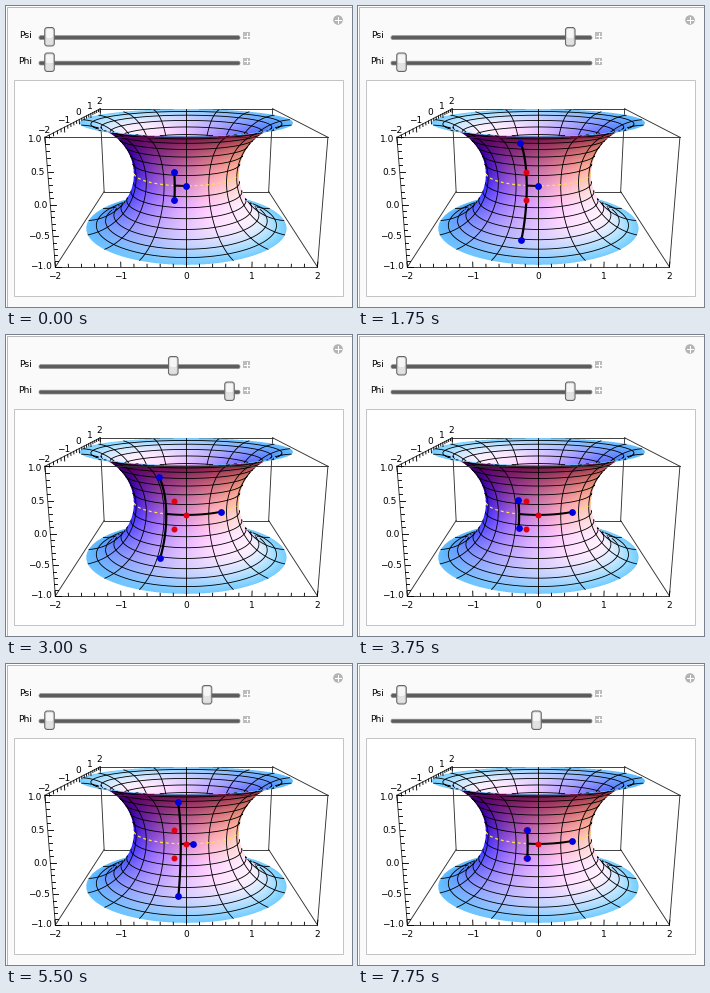
A matplotlib script that plays this animation: 346 by 301 pixels, repeating every 8000 ms.

```python
import numpy as np
import matplotlib.pyplot as plt
from matplotlib.animation import FuncAnimation
from matplotlib.patches import Circle, FancyBboxPatch, Rectangle

W, H, DPI = 346, 301, 100
PX = 72 / DPI                       # points per pixel
CX, CY, FOCAL = 180.4, 165.6, 429
EYE = np.array([0.0, -8.0, 2.0])
DIST = np.linalg.norm(EYE)
FWD = -EYE / DIST
UP = np.array([0.0, -FWD[2], FWD[1]])
U_MAX = 1.5

fig = plt.figure(figsize=(W / DPI, H / DPI), dpi=DPI, facecolor="white")
ax = fig.add_axes([0, 0, 1, 1])
ax.set_xlim(0, W)
ax.set_ylim(H, 0)
ax.axis("off")


# ---------- geometry ----------
def project(x, y, z):
    depth = DIST + y * FWD[1] + z * FWD[2]
    return (CX + FOCAL * x / depth,
            CY - FOCAL * (y * UP[1] + z * UP[2]) / depth,
            depth)


def radius(u):
    return 2 - np.cos(u)


def throat(u, a):
    """Point of the surface; a is the angle from the side nearest the eye."""
    r = radius(u)
    return r * np.sin(a), -r * np.cos(a), np.sin(u) + 0 * a


def shade(u, a):
    cu, su = np.cos(u), np.sin(u)
    nx, ny, nz = cu * np.sin(a), -cu * np.cos(a), -su + 0 * a
    x, y, z = throat(u, a)
    facing = nx * (EYE[0] - x) + ny * (EYE[1] - y) + nz * (EYE[2] - z)
    side = np.where(facing < 0, -1, 1)
    nx, t, nz = nx * side, -ny * side, nz * side
    rim = np.maximum(nz, 0) ** 8
    red = 0.50 + 0.42 * nx + 0.35 * t + 0.20 * nz - 0.28 * rim
    green = 0.38 + 0.35 * nx + 0.18 * t + 0.40 * nz
    blue = 0.80 - 0.10 * nx + 0.02 * t + 0.55 * nz
    return np.clip(np.stack([red, green, blue], -1), 0, 1)


def render_surface(n=3):
    """Splat the surface far to near; return the image and its depth map."""
    u, a = np.meshgrid(np.linspace(-U_MAX, U_MAX, 900),
                       np.linspace(-np.pi, np.pi, 2400))
    u, a = u.ravel(), a.ravel()
    px, py, depth = project(*throat(u, a))
    order = np.argsort(-depth)
    col = (px[order] * n).astype(int)
    row = (py[order] * n).astype(int)
    big = np.zeros((H * n, W * n, 4))
    zmap = np.full((H * n, W * n), np.inf)
    big[row, col, :3] = shade(u, a)[order]
    big[row, col, 3] = 1
    zmap[row, col] = depth[order]
    cells = big.reshape(H, n, W, n, 4).sum(axis=(1, 3))
    alpha = cells[..., 3:]
    rgb = cells[..., :3] / np.maximum(alpha, 1)
    return np.concatenate([rgb, alpha / n ** 2], -1), zmap, n


# ---------- drawing helpers ----------
def stroke(x, y, color="black", width=1.0, z=3, **kw):
    return ax.plot(x, y, color=color, lw=width * PX, zorder=z, **kw)[0]


def edge(p, q, color="#303030", z=4, width=0.9):
    (x0, x1), (y0, y1), _ = project(*np.array([p, q], float).T)
    stroke([x0, x1], [y0, y1], color, width, z)


def label(x, y, text, size=9, ha="center"):
    ax.text(x, y, text, fontsize=size * PX, family="DejaVu Sans",
            ha=ha, va="center", color="black", zorder=6)


def frame_box(x, y, w, h, fill, line):
    ax.add_patch(Rectangle((x, y), w, h, fc=fill, ec=line, lw=PX, zorder=0))


def plus(x, y, r):
    stroke([x - r, x + r], [y, y], "white", 1, 6)
    stroke([x, x], [y - r, y + r], "white", 1, 6)


def rounded(x, y, w, h, r, fc, ec, z, lw=1.0):
    box = FancyBboxPatch((x, y), w, h, fc=fc, ec=ec, lw=lw * PX, zorder=z,
                         boxstyle=f"round,pad=0,rounding_size={r}")
    return ax.add_patch(box)


# ---------- panel and sliders ----------
frame_box(0.5, 0.5, W - 1, H - 1, "#fafafa", "#b8b8b8")
frame_box(7.5, 73.5, 329, 216, "white", "#c4c4c4")
ax.add_patch(Circle((332, 14), 4.8, fc="#b4b4b4", ec="none", zorder=5))
plus(332, 14, 2.6)


class Slider:
    def __init__(self, name, y):
        label(26, y - 1.5, name, 9.2, "right")
        rounded(33, y - 1.8, 201, 3.8, 1.8, "#5c5c5c", "#8c8c8c", 4, 0.7)
        ax.add_patch(Rectangle((237, y - 5.5), 7, 7, fc="#bcbcbc",
                               ec="none", zorder=5))
        plus(240.5, y - 2, 2.2)
        self.parts = [
            (0.0, rounded(0, y - 10, 9.6, 18.5, 2.6, "#d2d2d2", "#666666", 6)),
            (1.4, rounded(0, y - 8.5, 6.8, 9, 1.6, "#f6f6f6", "none", 7)),
            (1.4, rounded(0, y + 0.5, 6.8, 6.5, 1.6, "#e2e2e2", "none", 7)),
        ]

    def set(self, value):
        left = 38.7 + 180 * value
        for dx, part in self.parts:
            part.set_x(left + dx)


psi_slider = Slider("Psi", 31.5)
phi_slider = Slider("Phi", 57)

# ---------- box, ticks and labels ----------
for s in (-2, 2):
    edge((s, 2, -1), (s, 2, 1), z=1)
    edge((s, -2, -1), (s, 2, -1), z=1)
    edge((s, -2, 1), (s, 2, 1))
    edge((s, -2, -1), (s, -2, 1))
for s in (-1, 1):
    edge((-2, -2, s), (2, -2, s))
    edge((-2, 2, s), (2, 2, s), z=1)

for i in range(-10, 11):
    size = 0.08 if i % 5 == 0 else 0.045
    edge((i / 5, -2, -1), (i / 5, -2, -1 + size), "black")
    edge((-2, i / 5, 1), (-2, i / 5, 1 - size), "black")
    edge((-2, -2, i / 10), (-2 + size, -2, i / 10), "black")


def number(text):
    return text.replace("-", "\u2212")


for i in range(-2, 3):
    x, y, _ = project(i, -2, -1)
    label(x - 0.5, y + 10, number(str(i)))
    x, y, _ = project(-2, i, 1)
    label(x - 1, y - 7, number(str(i)))
    x, y, _ = project(-2, -2, i / 2)
    label(x - 3, y + 2 * (i + 1) / 3, number(f"{i / 2:.1f}"), ha="right")

# ---------- surface with its mesh ----------
image, zmap, zn = render_surface()
ax.imshow(image, extent=(0, W, H, 0), interpolation="nearest",
          aspect="auto", zorder=2)
ax.set_xlim(0, W)
ax.set_ylim(H, 0)


def on_surface(u, a, color="black", width=0.85, **kw):
    x, y, depth = project(*throat(u, a))
    shown = depth < zmap[(y * zn).astype(int), (x * zn).astype(int)] + 0.05
    stroke(np.where(shown, x, np.nan), np.where(shown, y, np.nan),
           color, width, **kw)


turn = np.linspace(-np.pi, np.pi, 900)
rise = np.linspace(-U_MAX, U_MAX, 500) * 0.998
for j in range(-7, 8):
    if j:
        on_surface(np.full_like(turn, j * U_MAX / 8), turn)
for j in range(16):
    on_surface(rise, np.full_like(rise, j * np.pi / 8))
on_surface(0 * turn, turn, "#ffe640", 1.2, dashes=(2.4, 2.4))

# ---------- the three-point swimmer ----------
U0, U1 = 0.25, 1.0                  # half spread of the pair
L0, L1 = 0.2, 1.0                   # stem length
STEPS = [0, 1, 7, 8, 11, 12, 15, 16, 23, 25, 28]
TRAVEL = [0, 3, 27, 32, 47, 49, 61, 66, 94, 103, 116]
CORNERS = [0, 16, 32, 48, 64]


def recoil(u):
    """Turn of the pair when the stem stretches fully at spread u."""
    return (L1 - L0) / (2 * radius(u) ** 2 + 1)


def pose(step):
    lap, q = divmod(np.interp(step, STEPS, TRAVEL), 64)
    psi = np.interp(q, CORNERS, [0, 1, 1, 0, 0])
    phi = np.interp(q, CORNERS, [0, 0, 1, 1, 0])
    out, back = -recoil(U1), recoil(U0)
    angle = -L0 + lap * (out + back)
    angle += np.interp(q, CORNERS, [0, 0, out, out, out + back])
    return psi, phi, angle


def dots(u, angle, length):
    x, y, _ = project(*throat(np.array([u, -u, 0]),
                              np.array([angle, angle, angle + length])))
    return x, y


bar = stroke([], [], width=2.2, z=7)
stem = stroke([], [], width=2.0, z=7)
stroke(*dots(U0, -L0, L0), "#e00010", z=8, ls="none", marker="o",
       ms=6 * PX, mew=0)
blue = stroke([], [], "#0000dc", z=9, ls="none", marker="o",
              ms=6.8 * PX, mew=0)


def draw(i):
    psi, phi, angle = pose(max(0, i - 3))
    u = U0 + (U1 - U0) * psi
    length = L0 + (L1 - L0) * phi
    s = np.linspace(0, 1, 40)
    bar.set_data(*project(*throat(u * (2 * s - 1), angle + 0 * s))[:2])
    stem.set_data(*project(*throat(0 * s, angle + length * s))[:2])
    blue.set_data(*dots(u, angle, length))
    psi_slider.set(psi)
    phi_slider.set(phi)
    return bar, stem, blue


anim = FuncAnimation(fig, draw, frames=32, interval=250, repeat=True,
                     repeat_delay=0, init_func=lambda: draw(0))
plt.show()
```
